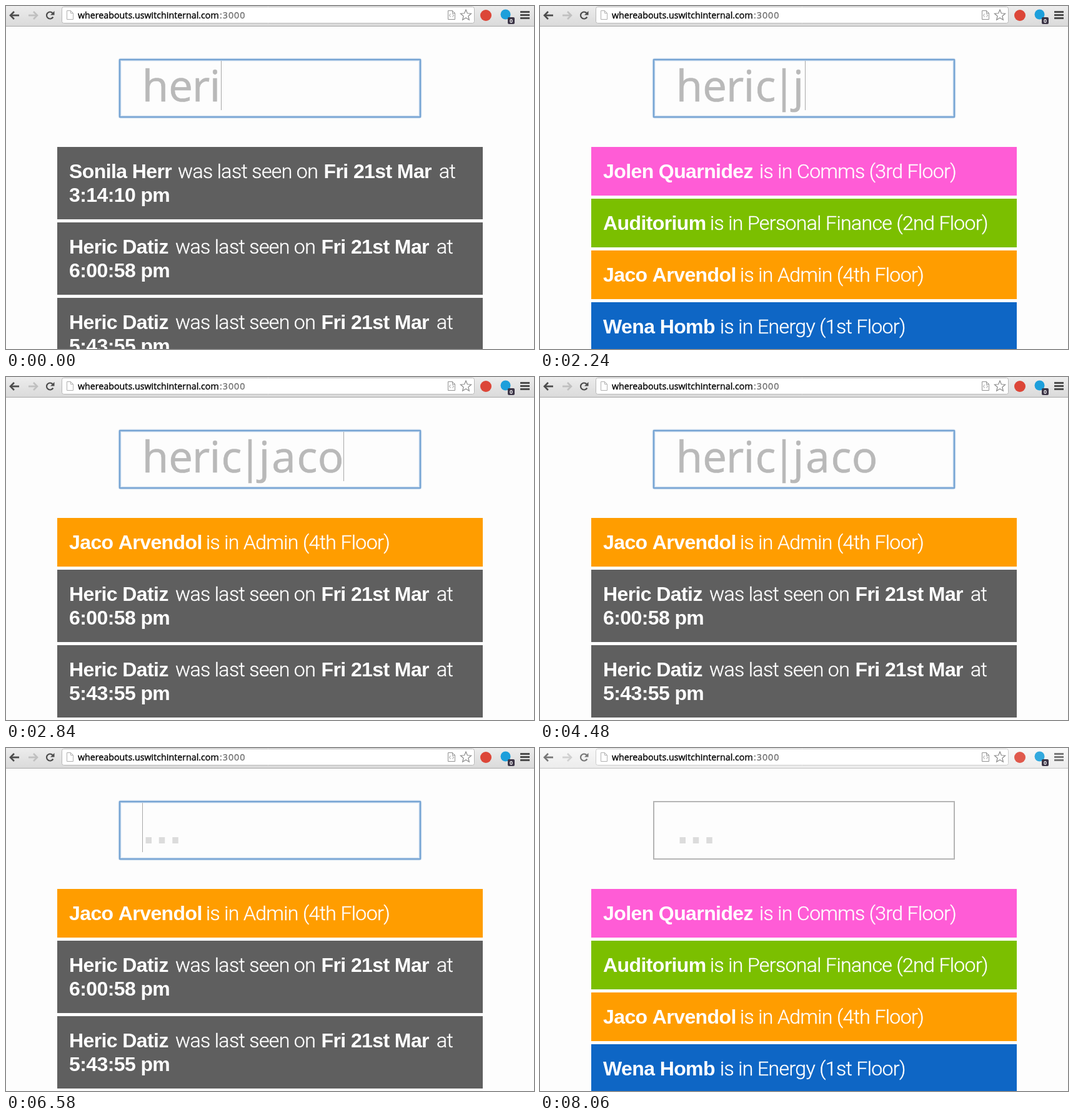
Animation, 845 px wide and 550 px high, one loop 8.16 s. Source, as an HTML page with a canvas:

```html
<!DOCTYPE html>
<html lang="en">
<head>
<meta charset="utf-8">
<title>Whereabouts</title>
<style>
  html, body { margin: 0; width: 100%; height: 100%; overflow: hidden; background: #fdfdfd; }
  canvas { display: block; width: 845px; height: 550px; }
</style>
</head>
<body>
<canvas id="stage" width="845" height="550"></canvas>
<script>
const ctx = document.getElementById('stage').getContext('2d');
const LOOP = 8160;

const BOLD = 'bold 32px "Liberation Sans", sans-serif';
const LIGHT = '300 32px Roboto, "Liberation Sans", sans-serif';
const INPUT = '69px "Open Sans", "Noto Sans", sans-serif';
const URL_FONT = '14.25px "Open Sans", "Noto Sans", sans-serif';

// Each person: bar colour, name, where the name ends, place or time last seen
const here = (color, name, tailX, place) => ({ color, name, tailX, place });
const gone = (name, tailX, time) => ({ color: '#5f5f5f', name, tailX, time });
const jolen = here('#ff5cd6', 'Jolen Quarnidez', 351, 'is in Comms (3rd Floor)');
const hall = here('#7bbf00', 'Auditorium', 272, 'is in Personal Finance (2nd Floor)');
const jaco = here('#ff9d00', 'Jaco Arvendol', 320, 'is in Admin (4th Floor)');
const wena = here('#0e66c5', 'Wena Homb', 288, 'is in Energy (1st Floor)');
const sonila = gone('Sonila Herr', 275, '3:14:10 pm');
const heric = gone('Heric Datiz', 271, '6:00:58 pm');
const hericOld = gone('Heric Datiz', 271, '5:43:55 pm');
const everyone = [jolen, hall, jaco, wena];

// Timelines: [start, value]
const lists = [
  [0, [sonila, heric, hericOld]],
  [150, [heric, hericOld]],
  [1940, everyone],
  [2390, [jolen, jaco, heric, hericOld]],
  [2840, [jaco, heric, hericOld]],
  [6730, everyone]
];
const query = 'heric|jaco';
const typed = [[0, 4], [300, 5], [1800, 6], [2240, 7], [2390, 8], [2690, 9], [2840, 10], [6580, 0]];
const caret = [
  [0, 1], [900, 0], [1500, 1], [3590, 0], [4030, 1], [4480, 0], [5080, 1],
  [5530, 0], [6580, 1], [7170, 0], [7620, 1], [8060, 0]
];
const stops = [218, 260, 299, 325, 344, 378, 403, 424, 465, 499, 540];

function at(track, t) {
  let value = track[0][1];
  for (const [start, v] of track) if (t >= start) value = v;
  return value;
}

function rect(x, y, w, h, color) {
  ctx.fillStyle = color;
  ctx.fillRect(x, y, w, h);
}

// A thin outline thickens the letters slightly
function text(str, x, y, font, color, { spacing = 0, align = 'left', outline = 0 } = {}) {
  ctx.font = font;
  ctx.letterSpacing = spacing + 'px';
  ctx.textAlign = align;
  ctx.fillStyle = color;
  ctx.fillText(str, x, y);
  if (!outline) return;
  ctx.strokeStyle = color;
  ctx.lineWidth = outline;
  ctx.strokeText(str, x, y);
}

function line(points, color, width, close) {
  ctx.beginPath();
  points.forEach(([x, y]) => ctx.lineTo(x, y));
  if (close) ctx.closePath();
  ctx.strokeStyle = color;
  ctx.lineWidth = width;
  ctx.stroke();
}

function disc(x, y, r, color) {
  ctx.beginPath();
  ctx.arc(x, y, r, 0, 7);
  ctx.fillStyle = color;
  ctx.fill();
}

function panel(x, y, w, h, r, fill, border) {
  ctx.beginPath();
  ctx.roundRect(x, y, w, h, r);
  ctx.fillStyle = fill;
  ctx.fill();
  if (!border) return;
  ctx.strokeStyle = border;
  ctx.lineWidth = 1;
  ctx.stroke();
}

function arrow(tip, dir, color) {
  line([[tip + 7 * dir, 9], [tip + dir, 15], [tip + 7 * dir, 21]], color, 2.6);
  line([[tip + dir, 15], [tip + 15 * dir, 15]], color, 2.8);
}

function reload(color) {
  ctx.beginPath();
  ctx.arc(70.5, 15, 5.5, 0.5, 5.5);
  ctx.strokeStyle = color;
  ctx.lineWidth = 2.2;
  ctx.stroke();
  ctx.beginPath();
  ctx.moveTo(77.5, 8);
  ctx.lineTo(77.5, 14.5);
  ctx.lineTo(71, 14.5);
  ctx.fillStyle = color;
  ctx.fill();
}

function page(x, y, w, h, color) {
  line([[x, y], [x + w - 4, y], [x + w, y + 4], [x + w, y + h], [x, y + h]], color, 1, true);
  line([[x + w - 4, y], [x + w - 4, y + 4], [x + w, y + 4]], color, 1);
}

function star(cx, cy, r, color) {
  const points = Array.from({ length: 10 }, (_, i) => {
    const a = i * Math.PI / 5 - Math.PI / 2, d = i % 2 ? r * 0.45 : r;
    return [cx + d * Math.cos(a), cy + d * Math.sin(a)];
  });
  line(points, color, 1.2, true);
}

function toolbar(active) {
  const shade = ctx.createLinearGradient(0, 0, 0, 32);
  shade.addColorStop(0, active ? '#ededed' : '#f8f8f8');
  shade.addColorStop(1, active ? '#dadada' : '#ececec');
  rect(0, 0, 845, 32, shade);
  rect(0, 32, 845, 1, active ? '#aaaaaa' : '#c4c4c4');
  panel(89.5, 1.5, 660, 26, 3, '#ffffff', active ? '#b8b8b8' : '#cccccc');

  const ink = active ? '#4c4c4c' : '#777777';
  arrow(6, 1, ink);
  arrow(51, -1, active ? '#c0c0c0' : '#d0d0d0');
  reload(ink);
  page(97.5, 7.5, 10, 14, '#b0b0b0');
  text('whereabouts.uswitchinternal.com', 115, 20, URL_FONT, '#000000', { outline: 0.35 });
  text(':3000', 342, 20, URL_FONT, '#6c6c6c', { spacing: 1, outline: 0.35 });

  page(707.5, 7.5, 11, 14, '#929292');
  line([[711.5, 12.5], [709.5, 15], [711.5, 17.5]], '#929292', 1);
  line([[714.5, 12.5], [716.5, 15], [714.5, 17.5]], '#929292', 1);
  star(736, 15, 9, '#8a8a8a');

  disc(768, 15, 9, active ? '#dc4638' : '#e0594c');
  disc(799.5, 13.5, 8, active ? '#1d9fdb' : '#32a9de');
  panel(803, 18, 11, 11, 2, '#3c3546');
  text('0', 808.5, 27, 'bold 9px "Liberation Sans", sans-serif', '#ffffff', { align: 'center' });
  for (let i = 0; i < 3; i++) rect(823, 8 + i * 5, 15, 3, ink);
}

function frame(color, width) {
  ctx.strokeStyle = color;
  ctx.lineWidth = width;
  ctx.beginPath();
  ctx.roundRect(182, 86, 481, 92, width > 2 ? 2 : 0);
  ctx.stroke();
}

function searchBox(t, active) {
  if (active) {
    frame('rgba(112,160,212,0.12)', 6);
    frame('rgba(112,160,212,0.35)', 4);
    frame('#76a4d3', 2);
  } else {
    frame('#b5b5b5', 2);
  }
  const count = at(typed, t);
  if (t >= 5830 && t < 6580) rect(218, 88, 322, 79, '#b2d2fd');
  if (!count) text('...', 219, 153, 'bold 67px "Liberation Sans", sans-serif', '#dcdcdc', { spacing: 2.7 });
  for (let i = 0; i < count; i++) {
    const x = (stops[i] + stops[i + 1]) / 2;
    text(query[i], x, 153, INPUT, '#b9b9b9', { align: 'center', outline: 0.7 });
  }
  if (at(caret, t)) rect(stops[count], 88, 1, 79, '#a8a8a8');
}

function results(rows) {
  let y = 226;
  for (const row of rows) {
    const h = row.time ? 116 : 78;
    const bold = (s, x, dy) => text(s, x, y + dy, BOLD, '#ffffff', { spacing: -0.6 });
    const light = (s, x) => text(s, x, y + 50, LIGHT, '#ffffff', { spacing: -0.63, outline: 0.4 });
    rect(82, y, 681, h, row.color);
    bold(row.name, 101, 50);
    if (row.time) {
      light('was last seen on', row.tailX);
      bold('Fri 21st Mar', row.tailX + 233.5, 50);
      light('at', row.tailX + 418);
      bold(row.time, 101, 88);
    } else {
      light(row.place, row.tailX);
    }
    y += h + 5;
  }
}

function draw(now) {
  const t = now % LOOP;
  const active = t < 8060;
  rect(0, 0, 845, 550, '#fdfdfd');
  toolbar(active);
  searchBox(t, active);
  results(at(lists, t));
}

const begin = performance.now();
function tick() {
  draw(performance.now() - begin);
  requestAnimationFrame(tick);
}
tick();
</script>
</body>
</html>
```
